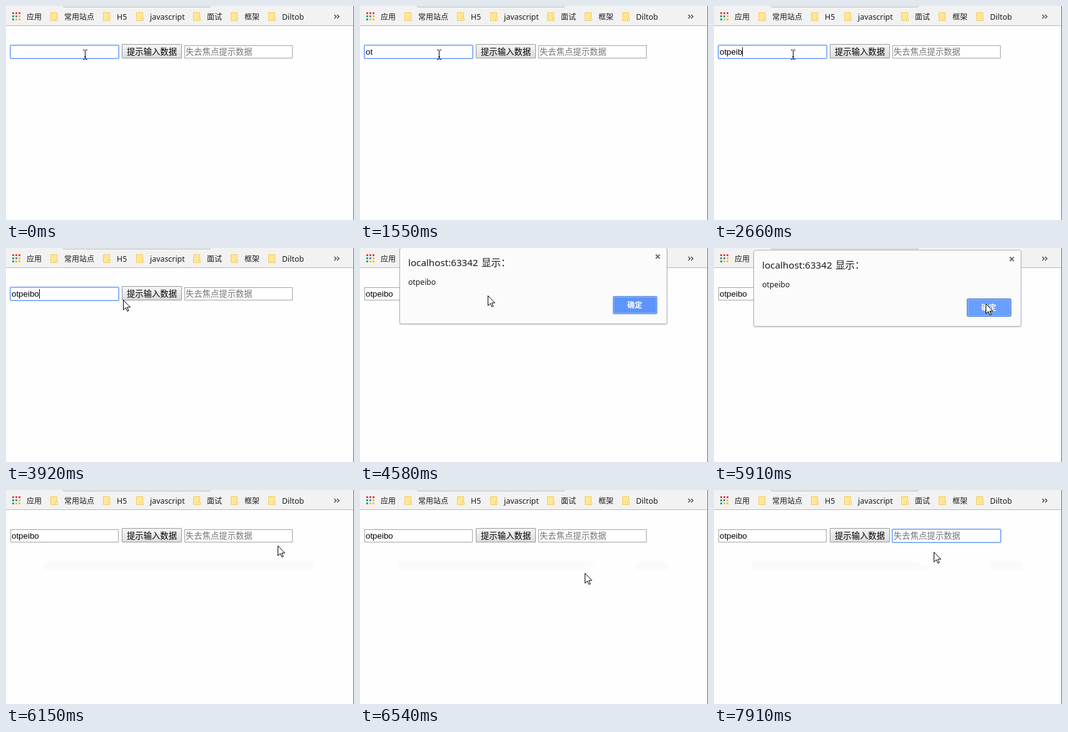
Animation of 556x343 px, one loop 8000 ms. Source, as an HTML page:

```html
<!DOCTYPE html>
<html lang="zh-CN">
<head>
<meta charset="utf-8">
<title>提示输入数据</title>
<style>
html, body { margin: 0; width: 100%; height: 100%; overflow: hidden; background: #fefefe; }
svg { display: block; width: 556px; height: 343px; }
text { font-family: "Noto Sans CJK SC", "Noto Sans CJK", sans-serif; fill: #1a1a1a; white-space: pre; }
.bar text { font-size: 12px; }
.bar .lat, .dlg .lat { font-family: "Noto Sans", "Open Sans", sans-serif; }
.bar .lat { font-size: 12.4px; }
.form text { font-size: 13.333px; fill: #000; }
.form .hint { fill: #757575; }
.form .arial { font-family: "Liberation Sans", Arial, sans-serif; }
.box { fill: #fff; stroke: #a3a3a3; }
.ring { fill: none; stroke: #6c9ff6; }
.ring + .ring { stroke: #a9c8fb; }

.anim { animation: 8s step-end infinite; }

/* typed text is uncovered by a white sheet that follows the caret */
#pen { animation-name: pen; }
@keyframes pen {
  0% { transform: translate(9px, 66px); }
  1.5% { transform: translate(16px, 66px); }
  12.75% { transform: translate(20px, 66px); }
  26.375% { transform: translate(28px, 66px); }
  29.875% { transform: translate(35px, 66px); }
  31.75% { transform: translate(38px, 66px); }
  33.25% { transform: translate(45px, 66px); }
  36.75% { transform: translate(53px, 66px); }
}
#caret { animation-name: blink; }
@keyframes blink {
  0%, 9.25%, 19.375%, 41.75%, 53.875% { opacity: 0; }
  1.5%, 12.75%, 26.375%, 47.5% { opacity: 1; }
}
#caret2 { animation-name: blink2; }
@keyframes blink2 { 0%, 97.375% { opacity: 0; } 89% { opacity: 1; } }

#focus1 { animation-name: focus1; }
@keyframes focus1 { 0% { opacity: 1; } 53.875% { opacity: 0; } }
#focus2 { animation-name: focus2; }
@keyframes focus2 { 0% { opacity: 0; } 89% { opacity: 1; } }

#btn { animation-name: btn; }
@keyframes btn {
  0%, 57.25% { fill: url(#up); stroke: #999; }
  52% { fill: url(#over); stroke: #808080; }
  53.875% { fill: url(#down); stroke: #808080; }
}

.dlg { animation-name: dlg; }
@keyframes dlg {
  0%, 76.875% { opacity: 0; transform: translate(0, -4px); }
  57.25% { opacity: 1; transform: translate(0, -4px); }
  58.75% { opacity: 1; transform: none; }
}
#ok { animation-name: ok; }
@keyframes ok {
  0% { fill: #5d95fb; stroke: #4a7fd8; }
  73.875% { fill: #699fff; stroke: #2f66c4; }
  75.375% { fill: #4a83ea; stroke: #2f66c4; }
}

/* faint strip left after the dialog closes, wiped where the pointer passes */
#trace { animation-name: trace; }
@keyframes trace { 0% { opacity: 0; } 76.875% { opacity: 1; } }
#wipe1 { animation-name: wipe1; }
@keyframes wipe1 { 0% { opacity: 0; } 79.875% { opacity: 1; } }
#wipe2 { animation-name: wipe2; }
@keyframes wipe2 { 0% { opacity: 0; } 81.75% { opacity: 1; } }
#wipe3 { animation-name: wipe3; }
@keyframes wipe3 { 0% { opacity: 0; } 85.25% { opacity: 1; } }
#wipe4 { animation-name: wipe4; }
@keyframes wipe4 { 0% { opacity: 0; } 87.125% { opacity: 1; } }

#beam { animation-name: beam; }
@keyframes beam {
  0% { opacity: 1; transform: translate(123px, 70px); }
  45.625% { transform: translate(142px, 70px); }
  47.5% { transform: translate(165px, 75px); }
  49% { opacity: 0; }
  87.125% { opacity: 1; transform: translate(327px, 66px); }
  89% { transform: translate(324px, 63px); }
  93.625% { transform: translate(348px, 72px); }
  95.5% { opacity: 0; }
}
#arrow { animation-name: arrow; }
@keyframes arrow {
  0% { opacity: 0; transform: translate(187px, 83px); }
  49% { opacity: 1; transform: translate(187px, 83px); }
  50.5% { transform: translate(196px, 80px); }
  52% { transform: translate(204px, 76px); }
  62.25% { transform: translate(208px, 79px); }
  63.75% { transform: translate(168px, 73px); }
  65.25% { transform: translate(120px, 66px); }
  66.75% { transform: translate(146px, 66px); }
  68.625% { transform: translate(270px, 76px); }
  70.125% { transform: translate(376px, 86px); }
  72% { transform: translate(422px, 88px); }
  73.875% { transform: translate(434px, 89px); }
  78.375% { transform: translate(429px, 97px); }
  79.875% { transform: translate(374px, 121px); }
  81.75% { transform: translate(359px, 133px); }
  85.25% { transform: translate(345px, 102px); }
  87.125% { opacity: 0; }
  95.5% { opacity: 1; transform: translate(355px, 89px); }
  97.375% { transform: translate(353px, 95px); }
  98.875% { transform: translate(351px, 99px); }
}
</style>
</head>
<body>
<svg viewBox="0 0 556 343">
  <defs>
    <linearGradient id="up" x2="0" y2="1"><stop stop-color="#f5f5f5"/><stop offset="1" stop-color="#dcdcdc"/></linearGradient>
    <linearGradient id="over" x2="0" y2="1"><stop stop-color="#fafafa"/><stop offset="1" stop-color="#e4e4e4"/></linearGradient>
    <linearGradient id="down" x2="0" y2="1"><stop stop-color="#dcdcdc"/><stop offset="1" stop-color="#f2f2f2"/></linearGradient>
    <g id="folder">
      <path d="M.5 .5H10.5V13.5H.5Z" fill="#ffe794" stroke="#f0cd69"/>
      <path d="M8.5 9.5H11.5V13.5H8.5Z" fill="#fff1bd" stroke="#f0cd69"/>
    </g>
  </defs>

  <rect width="556" height="343" fill="#fefefe"/>

  <g class="bar">
    <rect width="556" height="31" fill="#f2f2f2"/>
    <rect y="31" width="556" height="1" fill="#b9b9b9"/>
    <path d="M91.5 -2V0Q91.5 1.5 93 1.5H325Q326.5 1.5 326.5 0V-2" fill="#fff" stroke="#b0b0b0"/>
    <g fill="#e8453c">
      <rect x="10" y="10" width="3" height="3"/><rect x="15" y="10" width="3" height="3"/><rect x="20" y="10" width="3" height="3"/>
    </g>
    <g fill="#1fa463">
      <rect x="10" y="15" width="3" height="3"/><rect x="10" y="20" width="3" height="3"/>
    </g>
    <rect x="15" y="15" width="3" height="3" fill="#4587f3"/>
    <g fill="#f9bb2d">
      <rect x="20" y="15" width="3" height="3"/><rect x="15" y="20" width="3" height="3"/><rect x="20" y="20" width="3" height="3"/>
    </g>
    <use href="#folder" x="71" y="10"/><use href="#folder" x="155" y="10"/><use href="#folder" x="208" y="10"/>
    <use href="#folder" x="299" y="10"/><use href="#folder" x="359" y="10"/><use href="#folder" x="419" y="10"/>
    <text x="33" y="22">应用</text>
    <text x="93" y="22">常用站点</text>
    <text class="lat" x="177" y="22">H5</text>
    <text class="lat" x="230" y="22">javascript</text>
    <text x="321" y="22">面试</text>
    <text x="381" y="22">框架</text>
    <text class="lat" x="441" y="22">Diltob</text>
    <path d="M524.5 14L527.5 17L524.5 20M529 14L532 17L529 20" fill="none" stroke="#555" stroke-width="1.6"/>
  </g>

  <g class="form">
    <rect class="box" x="7.5" y="63.5" width="172" height="20"/>
    <text class="arial" x="9" y="78">otpeibo</text>
    <g id="pen" class="anim">
      <rect width="48" height="16" fill="#fff"/>
      <rect id="caret" class="anim" width="1" height="15"/>
    </g>
    <g id="focus1" class="anim">
      <rect class="ring" x="6.5" y="62.5" width="174" height="22" rx="1.5"/>
      <rect class="ring" x="7.5" y="63.5" width="172" height="20"/>
    </g>

    <rect id="btn" class="anim" x="185.5" y="61.5" width="95" height="22" rx=".5"/>
    <text x="193" y="78">提示输入数据</text>

    <rect class="box" x="285.5" y="63.5" width="172" height="20"/>
    <text class="hint" x="287" y="78">失去焦点提示数据</text>
    <rect id="caret2" class="anim" x="287" y="66" width="1" height="15"/>
    <g id="focus2" class="anim">
      <rect class="ring" x="284.5" y="62.5" width="174" height="22" rx="1.5"/>
      <rect class="ring" x="285.5" y="63.5" width="172" height="20"/>
    </g>
  </g>

  <rect id="trace" class="anim" x="61" y="115" width="431" height="13" fill="#fafafa"/>
  <g fill="#fefefe">
    <rect id="wipe1" class="anim" x="373" y="115" width="68" height="13"/>
    <rect id="wipe2" class="anim" x="359" y="121" width="27" height="7"/>
    <rect id="wipe3" class="anim" x="345" y="115" width="26" height="13"/>
    <rect id="wipe4" class="anim" x="327" y="115" width="30" height="6"/>
  </g>

  <g class="dlg anim">
    <rect x="62.5" y="4" width="429" height="123.5" rx="3.5" fill="#000" opacity=".13"/>
    <rect x="63.5" y="3.5" width="427" height="122" rx="3" fill="#fbfbfb" stroke="#b3b3b3"/>
    <text class="lat" x="77" y="33" font-size="15.2">localhost:63342</text>
    <text x="194" y="33" font-size="15.5">显示：</text>
    <text class="lat" x="77" y="63" font-size="12.2">otpeibo</text>
    <path d="M472.5 14.5L479 21M479 14.5L472.5 21" stroke="#6e6e6e" stroke-width="2"/>
    <rect id="ok" class="anim" x="404.5" y="81.5" width="70" height="28" rx="1"/>
    <rect x="405.5" y="82.5" width="68" height="26" fill="none" stroke="#9fc1ff"/>
    <text x="427" y="100" font-size="12" font-weight="700" style="fill:#fff">确定</text>
  </g>

  <rect x="555" width="1" height="343" fill="#6b6b6b"/>

  <path id="beam" class="anim" d="M0 .5H2.5L3.5 1.5L4.5 .5H7M3.5 1V15M0 15.5H2.5L3.5 14.5L4.5 15.5H7M2 11.5H5" fill="none" stroke="#000"/>
  <path id="arrow" class="anim" d="M.5 .5V16.3L4.2 12.8L6.8 18.4L9 17.4L6.5 12H11.5Z" fill="#fff" stroke="#000"/>
</svg>
</body>
</html>
```
